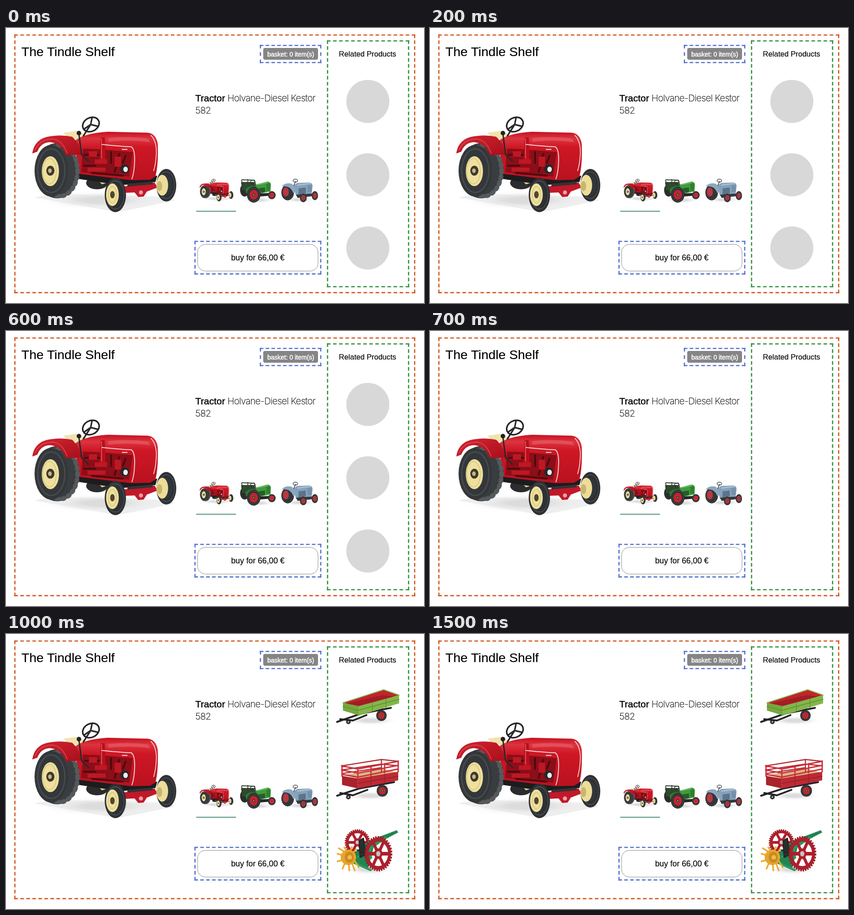
Recreate the animation shown at these times as an HTML page. Size 923 px wide and 607 px high, loop 1600 ms.

```html
<!DOCTYPE html>
<html lang="en">
<head>
<meta charset="utf-8">
<title>Product page</title>
<style>
  html, body { margin: 0; width: 100%; height: 100%; overflow: hidden; background: #fff; }
  svg { display: block; width: 923px; height: 607px; }
  text { font-family: "Liberation Sans", Arial, sans-serif; stroke: #000; stroke-width: .15; }
  .light { font: 200 20.5px Inter, Roboto, sans-serif; letter-spacing: -.7px; }
  .medium { stroke-width: .45; }
  .dash { fill: none; stroke-width: 2.65; }
  .line { fill: none; stroke-linecap: round; stroke-linejoin: round; }
  .holders { animation: holders 1.6s step-end infinite; }
  .products { animation: products 1.6s step-end infinite; }
  @keyframes holders { 0% { visibility: visible; } 43.75%, 100% { visibility: hidden; } }
  @keyframes products { 0% { visibility: hidden; } 50%, 100% { visibility: visible; } }
</style>
</head>
<body>
<svg viewBox="0 0 923 607">
  <defs>
    <linearGradient id="hood" x2="0" y2="1">
      <stop offset="0" stop-color="#c5101f"/>
      <stop offset=".14" stop-color="#dc3440"/>
      <stop offset=".32" stop-color="#cf1725"/>
      <stop offset="1" stop-color="#b81220"/>
    </linearGradient>
    <linearGradient id="fender" x2="1" y2="1">
      <stop offset="0" stop-color="#d32532"/>
      <stop offset="1" stop-color="#a80f1a"/>
    </linearGradient>
    <radialGradient id="shade">
      <stop offset=".3" stop-color="#dcdcdc"/>
      <stop offset="1" stop-color="#fff" stop-opacity="0"/>
    </radialGradient>

    <!-- unit tyre, hub takes the current colour -->
    <g id="tyre">
      <circle r="1" fill="#2e3134"/>
      <circle r=".82" fill="none" stroke="#4a4d50" stroke-width=".06"/>
      <circle r=".62" fill="currentColor"/>
      <circle r=".2" fill="#3a3630"/>
      <circle r=".09" fill="#b5ab90"/>
    </g>

    <!-- unit iron wheel -->
    <g id="iron" fill="none" stroke="#ad1f2c">
      <circle r=".95" stroke="#8e1722" stroke-width=".1" stroke-dasharray=".1 .07"/>
      <circle r=".81" stroke-width=".22"/>
      <path d="M-.75 0H.75M-.37-.65L.37.65M-.37.65L.37-.65" stroke-width=".2"/>
      <circle r=".3" fill="#ad1f2c" stroke="none"/>
      <circle r=".15" fill="#c9c4bd" stroke="none"/>
    </g>

    <g id="tractor">
      <path d="M62 374L110 366 330 372 374 380 300 396 245 406Z" fill="#ececec"/>
      <ellipse cx="215" cy="380" rx="150" ry="22" fill="url(#shade)"/>
      <ellipse cx="201" cy="342" rx="24" ry="14" fill="#2a2c2e"/>
      <path d="M203 336l22 -4 3 8 -16 5z" fill="#e9d993"/>
      <path d="M155 316L270 328 334 326 330 340 252 347 160 333Z" fill="#1c1c1f"/>

      <path d="M127 231L157 227 179 238 170 248 136 241Z" fill="#f1e3ad"/>
      <path d="M150 250Q172 232 225 229L312 231Q332 233 335 256 337 300 330 328L318 335 277 336 162 322Z" fill="url(#hood)"/>
      <path d="M225 243Q270 238 314 244L318 252Q270 246 226 251Z" fill="#e8636b" opacity=".6"/>
      <path d="M170 266L214 268 280 274 272 328 166 318Z" fill="#8c0e18"/>
      <path d="M174 280h36M172 304h26M190 320l68 6M232 274v24M250 278l-10 40M264 282l-6 16" class="line" stroke="#4d0a10" stroke-width="4"/>
      <path d="M183 272h18v12h-18zM180 308h40v9h-40zM196 290h27v10h-27zM240 284h14v22h-14z" fill="#bd1824"/>
      <path d="M209 241h9l2 49h-13z" fill="#b80f1c"/>
      <path d="M211 243v45" stroke="#dd4d57" stroke-width="2"/>
      <path d="M212 257Q245 261 276 262 285 266 284 295 283 320 278 333" class="line" stroke="#efd0d0" stroke-width="2"/>
      <path d="M320 237Q332 248 332 275 331 300 326 315" class="line" stroke="#f0c5c7" stroke-width="2"/>
      <path d="M256 268h12" stroke="#f3dddd" stroke-width="2"/>

      <ellipse cx="113" cy="315" rx="49" ry="61" fill="#3a3d40"/>
      <ellipse cx="119" cy="315" rx="39" ry="56" class="line" stroke="#55595c" stroke-width="10" stroke-dasharray="4 9" stroke-linecap="butt"/>
      <ellipse cx="100" cy="315" rx="37" ry="57" fill="#34373a"/>
      <ellipse cx="100" cy="315" rx="30" ry="48" class="line" stroke="#474b4e" stroke-width="3"/>
      <ellipse cx="98" cy="316" rx="19" ry="33" fill="#efe09d"/>
      <ellipse cx="96" cy="316" rx="15" ry="28" class="line" stroke="#d9ca88" stroke-width="2"/>
      <ellipse cx="98" cy="315" rx="9" ry="11" fill="#40392c"/>
      <ellipse cx="97" cy="315" rx="4" ry="5" fill="#c3b78c"/>
      <path d="M58 277Q62 249 88 241 118 234 146 240 160 252 168 279L132 281Q124 255 98 252 77 252 69 273Z" fill="url(#fender)"/>
      <path d="M64 270Q72 247 101 245 123 245 135 276" class="line" stroke="#dd4f59" stroke-width="1.500"/>
      <path d="M161 234L167 280 182 294" class="line" stroke="#28282b" stroke-width="3"/>
      <circle cx="161" cy="232" r="5" fill="#222"/>
      <path d="M187 213L171 238M187 213l-13 9M187 213l3-15M187 213l16 4" class="line" stroke="#2b2b2e" stroke-width="3.500"/>
      <ellipse cx="187.500" cy="213" rx="19" ry="15" transform="rotate(-28 187.500 213)" class="line" stroke="#252528" stroke-width="3.500"/>

      <path d="M258 350L328 341 335 352 311 361 304 372 292 373 284 363 258 364Z" fill="#c2182a"/>
      <path d="M268 347l56-5" stroke="#3a3033" stroke-width="6"/>
      <circle cx="298" cy="363" r="4.500" fill="#e7a3a5"/>
      <use href="#tyre" transform="matrix(22 0 0 36 354 347)" color="#30363a"/>
      <ellipse cx="345" cy="347" rx="13" ry="23" fill="#eddd98"/>
      <ellipse cx="339" cy="349" rx="6" ry="11" fill="#c8b570"/>
      <use href="#tyre" transform="matrix(23.5 0 0 38 241.500 368.500)" color="#2e3134"/>
      <ellipse cx="235" cy="368" rx="14" ry="25" fill="#efe09d"/>
      <ellipse cx="235" cy="368" rx="9" ry="18" class="line" stroke="#d9ca88" stroke-width="2"/>
      <ellipse cx="235" cy="368" rx="5" ry="8" fill="#51472f"/>
      <circle cx="262" cy="311" r="10" fill="#26282b"/>
      <ellipse cx="264" cy="312" rx="5" ry="6" fill="#edf1ee"/>
    </g>
  </defs>

  <rect width="923" height="607" fill="#fff"/>

  <use href="#tractor"/>
  <use href="#tractor" transform="translate(413.6 287.2) scale(.235)"/>

  <g id="green-tractor">
    <ellipse cx="557" cy="380" rx="40" ry="7" fill="url(#shade)"/>
    <ellipse cx="527" cy="358" rx="10" ry="14" fill="#2b2e2b"/>
    <path d="M519 342L546 341 556 350 552 362 522 358Z" fill="#2f4a2c"/>
    <path d="M520 341h29M520 336l5 16M534 334v16M549 337l3 12M521 335l28 1" class="line" stroke="#30402f" stroke-width="1.800"/>
    <path d="M550 346L577 339Q585 339 585 347L584 361 560 365Z" fill="#3f9c3c"/>
    <path d="M554 346l24-5" stroke="#77bf6c" stroke-width="2"/>
    <path d="M558 354l14-2v10l-11 3z" fill="#275c28"/>
    <path d="M575 343h8v16h-8z" fill="#2f7f30"/>
    <path d="M558 365l26-1v6l-24 2z" fill="#252825"/>
    <path d="M529 356Q539 346 552 350L564 363 530 365Z" fill="#2d7a33"/>
    <use href="#tyre" transform="matrix(15 0 0 17.500 547 368)" color="#c4242e"/>
    <use href="#tyre" transform="matrix(8.500 0 0 9 587 369)" color="#d02a34"/>
    <ellipse cx="545" cy="340" rx="5" ry="4" class="line" stroke="#2a2d2a" stroke-width="1.500"/>
  </g>

  <g id="blue-tractor">
    <ellipse cx="649" cy="379" rx="40" ry="7" fill="url(#shade)"/>
    <path d="M634 348L643 342 670 341Q677 342 677 349L675 365 640 369Z" fill="#86a2bb"/>
    <path d="M643 347l29-4" stroke="#b6c9d8" stroke-width="2"/>
    <path d="M646 354l16-2v13l-16 3z" fill="#5c7489"/>
    <path d="M666 347h9v15h-9z" fill="#7390aa"/>
    <path d="M640 368l38-3v6l-34 4z" fill="#34383d"/>
    <use href="#tyre" transform="matrix(14 0 0 17.500 622 363)" color="#33373b"/>
    <ellipse cx="618" cy="362" rx="6.500" ry="10" fill="#b93840"/>
    <path d="M609 350Q616 340 632 344L641 362 634 364Q628 347 609 350Z" fill="#8ca8c0"/>
    <path d="M640 338l-5 10" class="line" stroke="#333" stroke-width="1.500"/>
    <ellipse cx="639" cy="337" rx="5" ry="3.500" class="line" stroke="#444a50" stroke-width="1.500"/>
    <use href="#tyre" transform="matrix(7 0 0 10 682 370)" color="#b7353e"/>
    <use href="#tyre" transform="matrix(7.500 0 0 9.500 656.500 375)" color="#b7353e"/>
  </g>

  <path d="M420 404.500h88" stroke="#4f8f78" stroke-width="1.800"/>

  <g class="holders" fill="#d8d8d8">
    <circle cx="799" cy="162" r="47.500"/>
    <circle cx="799" cy="324" r="47.500"/>
    <circle cx="799" cy="485.500" r="47.500"/>
  </g>

  <g class="products">
    <g id="flat-trailer">
      <ellipse cx="805" cy="191" rx="62" ry="11" fill="url(#shade)"/>
      <path d="M731 194L783 176 850 163M738 188l28 3 30-12" class="line" stroke="#242427" stroke-width="4"/>
      <circle cx="756" cy="194" r="5" fill="#2a2a2c"/>
      <circle cx="756" cy="194" r="2" fill="#aaa"/>
      <path d="M745 152L834 123 868 135 779 160Z" fill="#c0242c"/>
      <path d="M750 154L832 135 858 138 779 160Z" fill="#a41c24"/>
      <path d="M744 152L779 159 780 180 744 169Z" fill="#75a83f"/>
      <path d="M779 159L868 135 868 153 780 180Z" fill="#83b64a"/>
      <path d="M744 152L834 123 868 135" class="line" stroke="#7fae46" stroke-width="2"/>
      <path d="M779 168l89-24M809 152v19M839 144v18M744 160l35 9" class="line" stroke="#5d8a31" stroke-width="1.300"/>
      <use href="#tyre" transform="matrix(11.500 0 0 12 829 180)" color="#c8242e"/>
    </g>

    <g id="rail-trailer">
      <ellipse cx="805" cy="357" rx="62" ry="11" fill="url(#shade)"/>
      <path d="M731 357L780 341 857 327M738 351l28 5 32-12" class="line" stroke="#242427" stroke-width="4"/>
      <circle cx="756" cy="360" r="5" fill="#2a2a2c"/>
      <circle cx="756" cy="360" r="2" fill="#aaa"/>
      <path d="M745 311L829 297 865 306 776 319Z" fill="#d6b687"/>
      <path d="M742 291L829 277 866 281M742 300l87-13 37 4M742 308l87-13M829 277v26" class="line" stroke="#b32a33" stroke-width="2.500"/>
      <path d="M741 291L777 298 866 281M741 300l36 7 89-17M743 310l34 6 89-18M742 290v24M777 298v22M806 292v22M836 286v20M866 280v24" class="line" stroke="#cc303a" stroke-width="3"/>
      <path d="M742 313L776 319 777 341 742 333Z" fill="#a9222c"/>
      <path d="M776 319L866 304 866 323 777 341Z" fill="#bd2934"/>
      <path d="M776 330l90-16M806 314v21M836 309v20" class="line" stroke="#94202a" stroke-width="1.300"/>
      <use href="#tyre" transform="matrix(12.500 0 0 13 831 346)" color="#c02832"/>
    </g>

    <g id="digger">
      <ellipse cx="800" cy="519" rx="58" ry="14" fill="url(#shade)"/>
      <use href="#iron" transform="matrix(28 0 0 29 776 460)"/>
      <path d="M768 484L802 456 863 433 866 438 813 466 800 516 767 506Z" fill="#218452"/>
      <path d="M778 492l60-42M769 505l36 16M802 457l4 37" class="line" stroke="#2c9a61" stroke-width="5"/>
      <path d="M780 457l9-6 6 36-13 6zM776 477l20 8" class="line" style="fill:#28302d" stroke="#222927" stroke-width="3"/>
      <use href="#iron" transform="matrix(31 0 0 39 822 485)"/>
      <path d="M748 481l-13-8M753 479l-6-8M760 479l4-9M767 483l6-8M742 488l-10-3M742 499l-10 3M748 507l-5 11M757 508l1 14M764 505l6 17M769 499l10 16" class="line" stroke="#ebaa2c" stroke-width="3.500"/>
      <ellipse cx="756" cy="493" rx="17" ry="17" fill="#e6a52b"/>
      <ellipse cx="758" cy="493" rx="10" ry="12" fill="#c98a20"/>
      <circle cx="759" cy="493" r="5" fill="#efbd4d"/>
    </g>
  </g>

  <rect x="568" y="44" width="121" height="26" rx="4" fill="#858585"/>
  <rect x="423" y="477.500" width="266" height="59" rx="17.700" fill="#fff" stroke="#888"/>

  <text x="34" y="61.500" font-size="28.500">The Tindle Shelf</text>
  <text x="577" y="62.500" font-size="14" fill="#fff" style="stroke:#fff;stroke-width:.5">basket: 0 item(s)</text>
  <text x="735" y="62.500" font-size="16.500">Related Products</text>
  <text x="418" y="162" font-size="21" class="medium">Tractor</text>
  <text x="489" y="162" class="light">Holvane-Diesel Kestor</text>
  <text x="418" y="188.500" class="light">582</text>
  <text x="497" y="513" font-size="17.700">buy for 66,00 €</text>

  <g class="dash" id="outlines"></g>
</svg>
<script>
  const outlines = document.getElementById('outlines');
  const WIDTH = 2.65, DASH = 3 * WIDTH, GAP = 2 * WIDTH;

  // A side starts and ends with a full dash, the gaps share the rest.
  function side(x, y, dir, length, stroke) {
    const count = Math.round((length + GAP) / (DASH + GAP));
    const gap = (length - count * DASH) / (count - 1);
    const path = document.createElementNS('http://www.w3.org/2000/svg', 'path');
    path.setAttribute('d', `M${x} ${y}${dir}${length}`);
    path.setAttribute('stroke', stroke);
    path.setAttribute('stroke-dasharray', `${DASH} ${gap}`);
    outlines.append(path);
  }

  // Takes the outer edges of the box.
  function outline(left, top, right, bottom, stroke) {
    const half = WIDTH / 2;
    for (const y of [top + half, bottom - half]) side(left, y, 'h', right - left, stroke);
    for (const x of [left + half, right - half]) side(x, top, 'v', bottom - top, stroke);
  }

  outline(18.3, 14.2, 903.7, 585.5, '#d2571f');
  outline(708.7, 27.2, 890.3, 572.3, '#2f8f3c');
  outline(560.5, 37.2, 696.3, 77.6, '#5272d0');
  outline(416, 469.7, 696.3, 544.2, '#5272d0');
</script>
</body>
</html>
```
